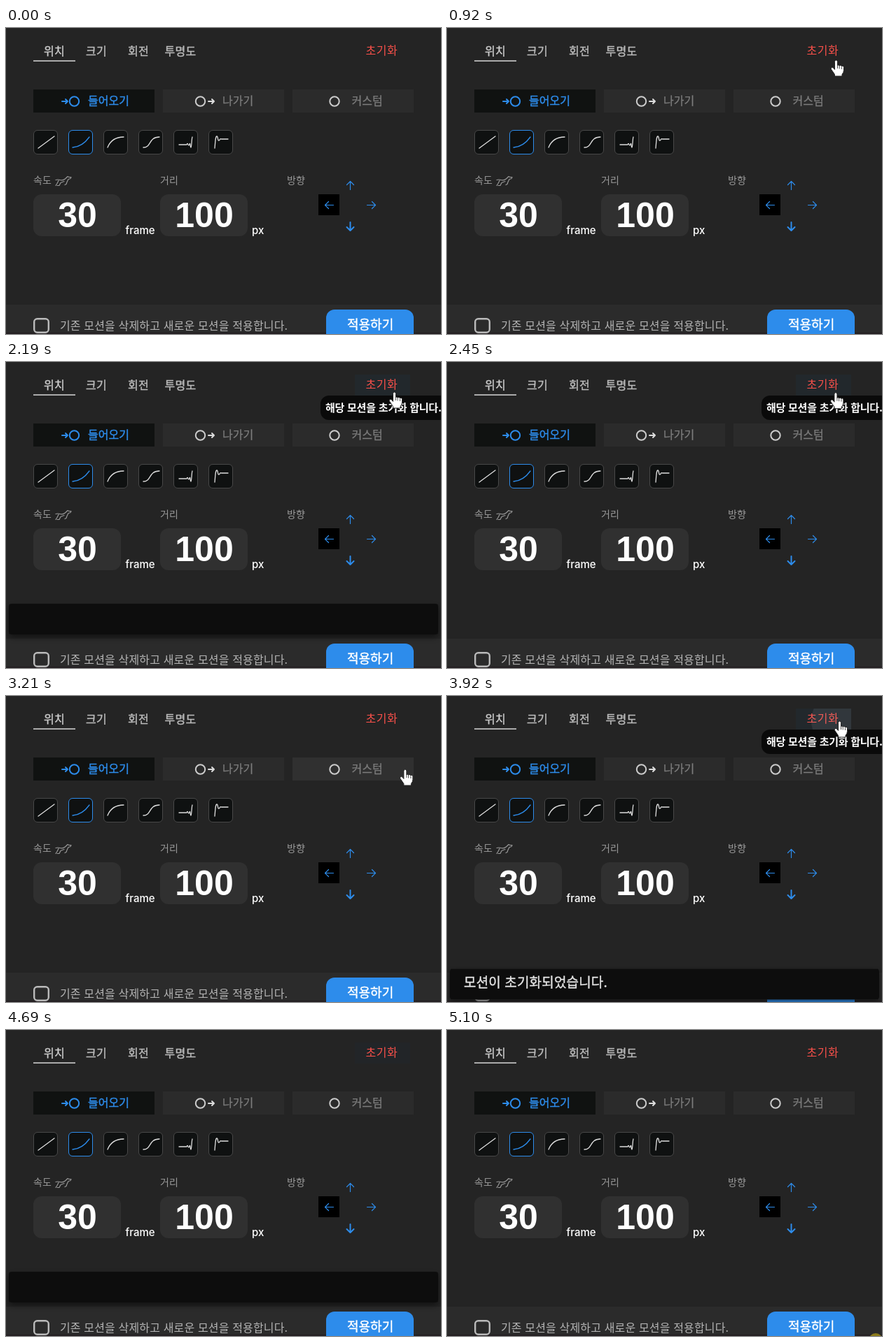
An HTML page that plays this animation: 621x438 px, repeating every 5.17 s.

```html
<!DOCTYPE html>
<html lang="ko">
<head>
<meta charset="utf-8">
<style>
html, body { margin: 0; width: 100%; height: 100%; overflow: hidden; background: #242424; }
svg { display: block; }
text { font: 400 16px "Noto Sans CJK KR", "Noto Sans CJK", "Noto Sans", sans-serif; color: #bcbcbc; fill: currentColor; }
.medium { stroke: currentColor; stroke-width: .4; }
.tab { letter-spacing: .3px; }
.mode { color: #7c7c7c; stroke-width: .25; }
.label { font-size: 14px; color: #999; }
.num { font: 700 50px "Liberation Sans", Arial, sans-serif; color: #fff; text-anchor: middle; }
.unit { font: 500 15px Inter, sans-serif; color: #fff; }
.line { fill: none; stroke: #ddd; stroke-width: 1.3; stroke-linecap: round; stroke-linejoin: round; }
.blue { stroke: #2d8ceb; }
.bold { stroke-width: 2; }
.curve rect { fill: #0f1111; stroke: #484848; }
.curve .on { stroke: #2d8ceb; }
.pointer path { fill: #fff; stroke: #222; stroke-width: 1; stroke-linejoin: round; }
.pointer .gap { fill: none; stroke-width: .8; }
</style>
</head>
<body>
<svg width="621" height="438" viewBox="0 0 621 438">
  <defs>
    <clipPath id="resetClip"><rect x="498" y="18" width="79" height="30"/></clipPath>
    <filter id="shadow" x="-5%" y="-60%" width="110%" height="220%">
      <feDropShadow dx="0" dy="4" stdDeviation="5" flood-opacity=".5"/>
    </filter>
  </defs>
  <rect width="621" height="438" fill="#242424"/>

  <!-- tabs -->
  <text class="tab medium" x="54" y="38.500" style="color:#ccc">위치</text>
  <text class="tab medium" x="114" y="38.500">크기</text>
  <text class="tab medium" x="174" y="38.500">회전</text>
  <text class="tab medium" x="226.500" y="38.500">투명도</text>
  <rect x="39" y="46.300" width="60" height="1.600" fill="#ccc"/>

  <!-- reset button -->
  <rect id="hover" x="498" y="18" width="79" height="30" fill="#22282c"/>
  <text x="513.500" y="37.500" style="color:#f8504a;letter-spacing:.5px">초기화</text>
  <g clip-path="url(#resetClip)"><circle id="ripple" fill="#b4bcc0"/></g>

  <!-- modes -->
  <rect x="39" y="88" width="173" height="33" fill="#101211"/>
  <rect x="224" y="88" width="173" height="33" fill="#2b2b2b"/>
  <rect id="custom" x="409" y="88" width="173" height="33"/>
  <g class="line bold">
    <path class="blue" d="M80 105h8m-3-3 3 3-3 3"/>
    <circle class="blue" cx="97.500" cy="105" r="6.700"/>
    <circle cx="277.500" cy="105" r="6.700" stroke="#ccc"/>
    <path d="M289 105h8m-3-3 3 3-3 3"/>
    <circle cx="469" cy="105" r="6.700" stroke="#ccc"/>
  </g>
  <text class="medium" x="117" y="109.500" style="color:#2d8ceb">들어오기</text>
  <text class="medium mode" x="309" y="109.500">나가기</text>
  <text class="medium mode" x="493.500" y="109.500">커스텀</text>

  <g class="curve" id="curves"></g>

  <!-- fields -->
  <text class="label" x="39" y="222.500">속도</text>
  <text class="label" x="220" y="222.500">거리</text>
  <text class="label" x="401" y="222.500">방향</text>
  <path class="line" style="stroke:#999;stroke-width:1.200" d="M71 217.500q3-1 6 0 4 1.500 8-2l3-3 2 1 3 0-1 2-3 1-2 4-1 3-2 1m-1-5-5 2-2 4-3 0m2-7-2 4-2 3"/>
  <rect x="39" y="238" width="125" height="60" rx="12" fill="#303030"/>
  <rect x="220" y="238" width="125" height="60" rx="12" fill="#303030"/>
  <text class="num" x="102" y="285">30</text>
  <text class="num" x="283" y="285">100</text>
  <text class="unit" x="170.500" y="294.500">frame</text>
  <text class="unit" x="351" y="294.500">px</text>

  <!-- directions -->
  <rect x="446" y="238" width="30" height="30"/>
  <g class="line blue" style="stroke-width:1.200">
    <path d="M491.500 231.500v-12m-5 5 5-5 5 5"/>
    <path d="M467.500 253.500h-12m5-5-5 5 5 5"/>
    <path d="M515.500 253.500h12m-5-5 5 5-5 5"/>
    <path class="bold" d="M491.500 278v12m-5-5 5 5 5-5"/>
  </g>

  <!-- footer -->
  <rect y="396" width="621" height="40" fill="#2b2b2b"/>
  <rect y="436" width="621" height="2" fill="#241f22"/>
  <rect x="40.200" y="416.200" width="20.600" height="19.600" rx="4.500" fill="none" stroke="#bbb" stroke-width="2.400"/>
  <text x="77" y="431.500" style="color:#b4b4b4;letter-spacing:.15px">기존 모션을 삭제하고 새로운 모션을 적용합니다.</text>
  <rect x="457" y="403" width="125" height="50" rx="12" fill="#2d8ceb"/>
  <text class="medium" x="487" y="430.500" style="font-size:18px;color:#fff">적용하기</text>

  <g id="toast">
    <rect x="4" width="613" height="44" rx="4" fill="#111" filter="url(#shadow)"/>
    <text id="message" class="medium" x="24" y="26.700" style="font-size:19px;letter-spacing:.15px;color:#e4e4e4">모션이 초기화되었습니다.</text>
  </g>
  <g id="tip">
    <rect x="449" y="48" width="190" height="35" rx="12" fill="#0a0a0a"/>
    <text x="456" y="70.500" style="font-size:15px;font-weight:700;letter-spacing:-.25px;color:#fff">해당 모션을 초기화 합니다.</text>
  </g>
  <circle id="spot" cx="612" cy="444" r="10" fill="#8c7b1c"/>
  <g id="pointer" class="pointer">
    <g id="hand">
      <path d="M.5 1q-2 0-2 2.500v11l-2-2.500q-1.500-1.500-3 0-.8 1 .2 2.500l4.800 7v2.500h10.500v-2.500q2.500-3 2.500-6v-4q0-2-1.500-2.200-1 0-1.500.7-.3-1.500-1.700-1.500t-1.600 1q-.3-1.500-1.500-1.500t-1.200.8v-5.300q0-2.500-2-2.500z"/>
      <path class="gap" d="M2.500 8.500v4.500M5.200 9.500v4M8.500 10.500v3.500"/>
    </g>
    <path id="arrow" d="M0 0v17l4-3.600 2.600 6 2.600-1.100-2.600-5.900h5.400z"/>
  </g>
</svg>
<script>
const LOOP = 5170;
const $ = id => document.getElementById(id);
const clamp = v => Math.max(0, Math.min(1, v));
const ramp = (t, from, to) => clamp((t - from) / (to - from));
const pulse = (t, a, b, c, d) => ramp(t, a, b) * (1 - ramp(t, c, d));
const show = (id, visible) => $(id).style.display = visible ? '' : 'none';
const inside = ([px, py], x, y, w, h) => px >= x && px < x + w && py >= y && py < y + h;

const curves = [
  'M7 26 30 9',
  'M6 25Q20 24 30 10',
  'M6 25Q12 10 29 10',
  'M7 25C19 25 14 10 30 10',
  'M8 21H19q1-3 2 0c1 2 2 0 2-1 1-3 1 5 2 5 1 0 1-13 2-15',
  'M9 26C10 15 10 9 12 9s1 7 3 6 1-3 3-2h10'
];
$('curves').innerHTML = curves.map((d, i) => {
  const on = i === 1;
  return `<g transform="translate(${39 + i * 50} 146)">
    <rect class="${on ? 'on' : ''}" x=".5" y=".5" width="34" height="34" rx="5.5"/>
    <path class="line ${on ? 'blue' : ''}" d="${d}"/></g>`;
}).join('');

// Each trip lists [time, x, y]; the pointer is absent between trips.
const trips = [
  [[480, 608, 440], [640, 598, 290], [780, 586, 130], [890, 557, 50], [920, 555, 45], [970, 554, 42],
   [2450, 554, 42], [2530, 588, 100], [2630, 622, 232]],
  [[2860, 602, 440], [3020, 592, 290], [3160, 577, 135], [3300, 556, 50], [3390, 555, 46], [3500, 560, 35],
   [4550, 560, 35], [4610, 588, 75], [4680, 624, 150]]
];

function pointerAt(t) {
  const trip = trips.find(p => t >= p[0][0] && t < p[p.length - 1][0]);
  if (!trip) return null;
  const i = trip.findIndex(p => p[0] > t);
  const a = trip[i - 1], b = trip[i], k = ramp(t, a[0], b[0]);
  return [a[1] + (b[1] - a[1]) * k, a[2] + (b[2] - a[2]) * k];
}

function drawPointer(t) {
  const p = pointerAt(t);
  show('pointer', p);
  const overCustom = p && inside(p, 409, 88, 173, 33);
  $('custom').setAttribute('fill', overCustom ? '#303030' : '#2b2b2b');
  if (!p) return;
  const hand = overCustom || inside(p, 498, 18, 79, 30) || inside(p, 457, 403, 125, 35);
  show('hand', hand);
  show('arrow', !hand);
  $('pointer').setAttribute('transform', `translate(${p})`);
}

function drawClick(t) {
  const second = t > 2900;
  const s = second ? t - 2500 : t; // both clicks share one timeline
  const [cx, cy] = second ? [560, 35] : [554, 42];
  const ripple = $('ripple');
  ripple.setAttribute('cx', cx);
  ripple.setAttribute('cy', cy);
  ripple.setAttribute('r', s < 1420 ? 8 + 32 * ramp(s, 1190, 1420) : 40 + 9 * ramp(s, 1420, 1580) + 35 * ramp(s, 1580, 1720));
  ripple.style.opacity = .1 * pulse(s, 1190, 1270, 1570, 1790);

  const rest = 1 - ramp(s, 1344, 1701);
  $('toast').setAttribute('transform', `translate(0 ${346 + 92 * rest ** 3})`);
  $('toast').style.opacity = 1 - ramp(s, 2195, 2295);
  show('toast', s >= 1344 && s < 2295);
  show('message', s < 2190);
}

function draw(t) {
  drawPointer(t);
  drawClick(t);
  $('tip').style.opacity = pulse(t, 930, 990, 2450, 2550) + pulse(t, 3310, 3370, 4550, 4640);
  $('hover').style.opacity = pulse(t, 1010, 1090, 2460, 2620) + pulse(t, 3370, 3450, 4600, 4800);
  show('spot', t >= 5100);
}

const start = performance.now();
function tick() {
  draw((performance.now() - start) % LOOP);
  requestAnimationFrame(tick);
}
tick();
</script>
</body>
</html>
```
